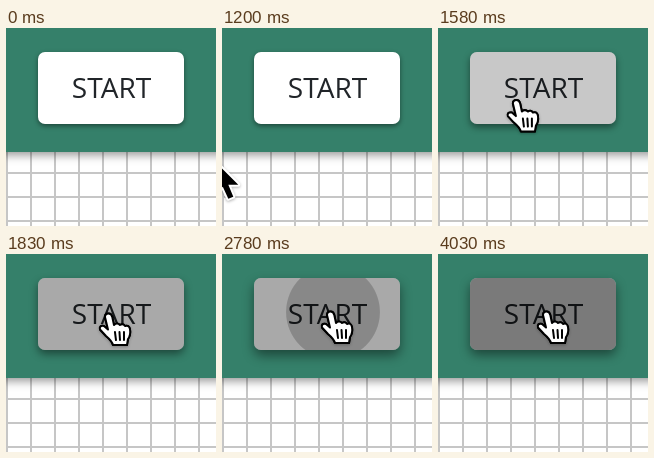
These frames come from a looping animation (210x198 px, 4060 ms). An HTML page with a canvas:

```html
<!DOCTYPE html>
<html lang="en">
<head>
<meta charset="utf-8">
<title>Start button</title>
<style>
  html, body { margin: 0; width: 100%; height: 100%; overflow: hidden; }
  canvas { display: block; width: 210px; height: 198px; }
</style>
</head>
<body>
<canvas width="210" height="198"></canvas>
<script>
const LOOP = 4060, HOVER = 1390, PRESS = 2600, REST = 2100;
const ctx = document.querySelector('canvas').getContext('2d');

const button = new Path2D();
button.roundRect(32, 24, 146, 72, 7);
const arrow = new Path2D('M0 0V32L7.5 25L13 37L18 35L13 23H23Z');
const hand = new Path2D(
  'M-4 3Q-4-.5-.5-.5Q2.5-.5 3.3 3L5 11Q8 8 11 11Q14 9 16 12Q20 10.5 21 15' +
  'Q22 21 19 25L18 31H4Q3 27-3 22L-9 15.5Q-10 11-5 12L-1 15.5Z');
const creases = new Path2D('M6 18L7 26M10.5 18L11 26M15 18V26');

const progress = (t, start, length) => Math.min(1, Math.max(0, (t - start) / length));

function withShadow(alpha, offset, blur, paint) {
  ctx.save();
  ctx.shadowColor = `rgba(0,0,0,${alpha})`;
  ctx.shadowOffsetY = offset;
  ctx.shadowBlur = blur;
  paint();
  ctx.restore();
}

function drawPage() {
  ctx.fillStyle = '#fff';
  ctx.fillRect(0, 0, 210, 198);
  ctx.fillStyle = '#c6c6c6';
  for (let p = 0; p < 210; p += 24) {
    ctx.fillRect(p, 0, 2, 198);
    ctx.fillRect(0, p, 210, 2);
  }
  ctx.fillStyle = '#35806a';
  withShadow(.42, 3, 9, () => ctx.fillRect(-20, -20, 250, 144));
}

function drawButton(t) {
  const hover = progress(t, HOVER, 300);
  const press = progress(t, PRESS, 260);
  const lift = hover + press * (1 - .5 * progress(t, 2900, 300));
  ctx.fillStyle = '#fff';
  withShadow(.45, 2 + 2 * lift, 5 + 4 * lift, () => ctx.fill(button));

  ctx.fillStyle = '#212529';
  ctx.font = '28px "Open Sans", "Noto Sans", sans-serif';
  ctx.textAlign = 'center';
  ctx.fillText('START', 105.5, 70);

  ctx.save();
  ctx.clip(button);
  ctx.fillStyle = `rgba(0,0,0,${.337 * hover})`;
  ctx.fillRect(32, 24, 146, 72);
  ctx.fillStyle = `rgba(0,0,0,${.28 * press})`;
  ctx.beginPath();
  ctx.arc(111, 58, 92 * progress(t, PRESS, 355), 0, 2 * Math.PI);
  ctx.fill();
  ctx.restore();
}

function drawCursor(t) {
  if (t < 1050) return;
  const left = Math.max(0, (REST - t) / 900);
  ctx.save();
  ctx.translate(109 - 116 * left ** 2.45, 58 + 76 * left ** 3);
  ctx.lineJoin = ctx.lineCap = 'round';
  const isHand = t >= HOVER;
  const shape = isHand ? hand : arrow;
  ctx.fillStyle = isHand ? '#fff' : '#000';
  ctx.strokeStyle = isHand ? '#000' : '#fff';
  ctx.lineWidth = isHand ? 2 : 4;
  withShadow(.3, 1, 3, () => ctx.stroke(shape));
  ctx.fill(shape);
  if (isHand) {
    ctx.stroke(shape);
    ctx.stroke(creases);
  }
  ctx.restore();
}

function frame() {
  const t = performance.now() % LOOP;
  drawPage();
  drawButton(t);
  drawCursor(t);
  requestAnimationFrame(frame);
}
frame();
</script>
</body>
</html>
```
